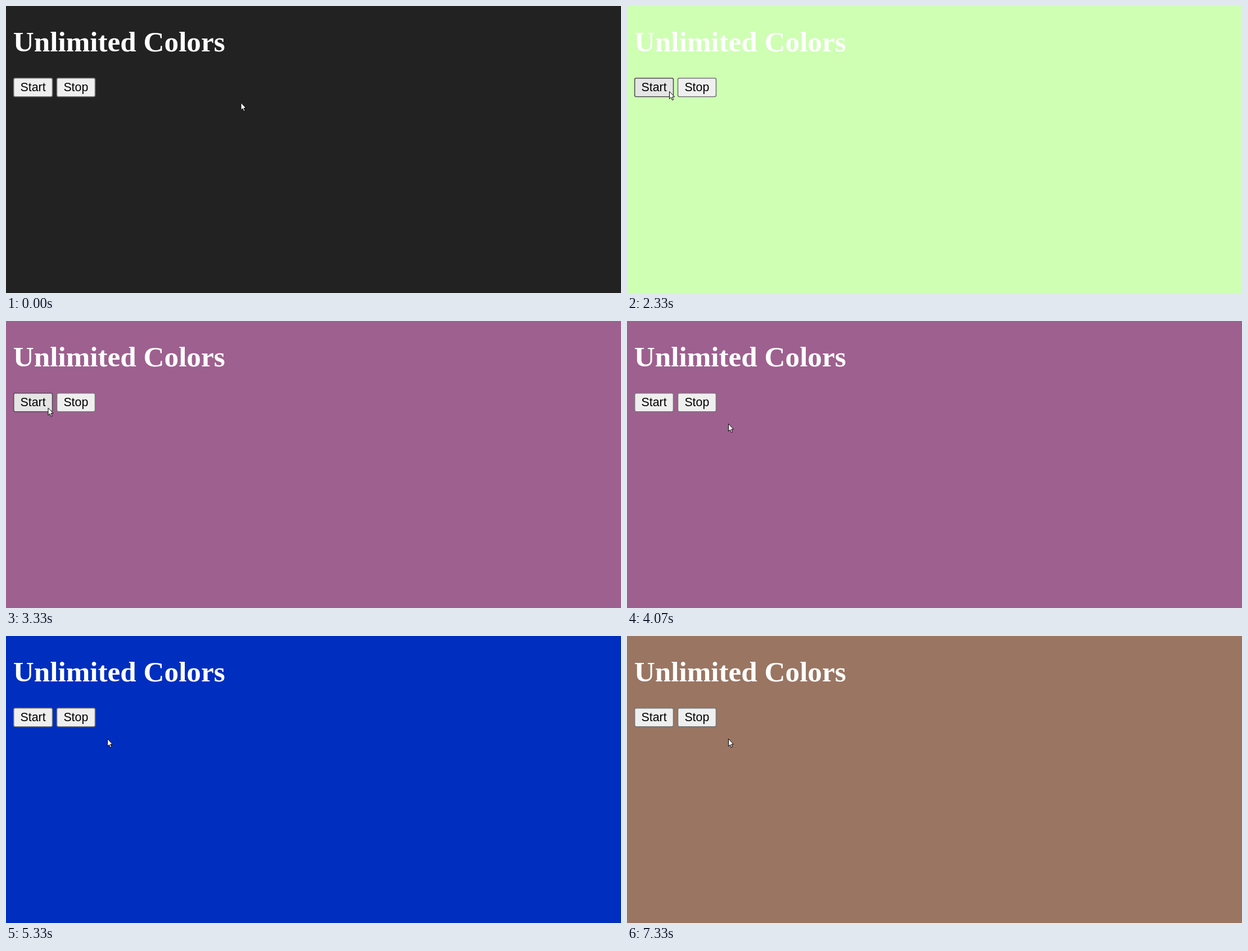
These frames come from a looping animation (1094x512 px, 8 s). An HTML page:

```html
<!DOCTYPE html>
<html lang="en">
<head>
<meta charset="utf-8">
<title>Unlimited Colors</title>
<style>
  html, body { margin: 0; width: 100%; height: 100%; overflow: hidden; background: #222; }
  svg { display: block; width: 1094px; height: 512px; }
  .title { font: bold 51.2px "Liberation Serif", "Times New Roman", serif; fill: #fff; }
  .button rect { fill: #efefef; stroke: #767676; stroke-width: 1.6px; }
  .button text { font: 21.33px "Liberation Sans", Arial, sans-serif; }
  .button.hover rect { fill: #e5e5e5; stroke: #4f4f4f; }
  .button.pressed rect { fill: #f5f5f5; stroke: #8d8d8d; }
  #cursor { fill: #fff; stroke: #000; stroke-linejoin: round; }
</style>
</head>
<body>
<svg viewBox="0 0 1094 512">
  <rect id="page" width="1094" height="512"/>
  <text class="title" x="12.8" y="80.5">Unlimited Colors</text>
  <g class="button" id="start">
    <rect x="13.7" y="128.7" width="68.8" height="33" rx="2.6"/>
    <text x="25.6" y="152">Start</text>
  </g>
  <g class="button" id="stop">
    <rect x="90.5" y="128.7" width="68" height="33" rx="2.6"/>
    <text x="102.4" y="152">Stop</text>
  </g>
  <path id="cursor" d="M0 0V13.2L3 10.4L5 15.4L7.2 14.5L5.1 9.6H9Z"/>
</svg>
<script>
const LOOP = 8000, TICK = 1000 / 15;
const get = id => document.getElementById(id);
const page = get('page'), start = get('start'), stop = get('stop'), cursor = get('cursor');

// [start time, background]
const colors = [
  [0, '#222222'], [2330, '#ceffb3'], [3330, '#9e608f'], [4330, '#6f8f7a'],
  [5330, '#002ebf'], [6400, '#dd5b1c'], [7330, '#9a7562']
];

// Each move follows a quadratic curve between two ticks.
const moves = [
  { from: 1, to: 14, path: [[418, 172.5], [246, 162], [75.5, 152.5]] },
  { from: 47, to: 49, path: [[75.5, 152.5], [75.2, 154], [75, 155]] },
  { from: 51, to: 61, path: [[75, 155], [130, 242], [180.5, 183.5]] }
];

const ease = p => p * p * (3 - 2 * p);

function cursorAt(tick) {
  const move = moves.findLast(m => tick >= m.from) || moves[0];
  const p = ease(Math.min(1, Math.max(0, (tick - move.from) / (move.to - move.from))));
  const [a, b, c] = move.path;
  return [0, 1].map(i => (1 - p) ** 2 * a[i] + 2 * p * (1 - p) * b[i] + p * p * c[i]);
}

const inside = (x, y, left, right) => x > left && x < right && y > 128 && y < 162.5;

function draw(now) {
  const time = now % LOOP;
  const tick = Math.floor((time + 5) / TICK);
  const [x, y] = cursorAt(tick);
  page.setAttribute('fill', colors.findLast(c => time >= c[0])[1]);
  cursor.setAttribute('transform', `translate(${x} ${y})`);
  start.classList.toggle('hover', inside(x, y, 13, 83));
  start.classList.toggle('pressed', time >= 1270 && time < 1330);
  stop.classList.toggle('hover', inside(x, y, 90, 159));
}

const origin = performance.now();
function frame() {
  draw(performance.now() - origin);
  requestAnimationFrame(frame);
}
frame();
</script>
</body>
</html>
```
